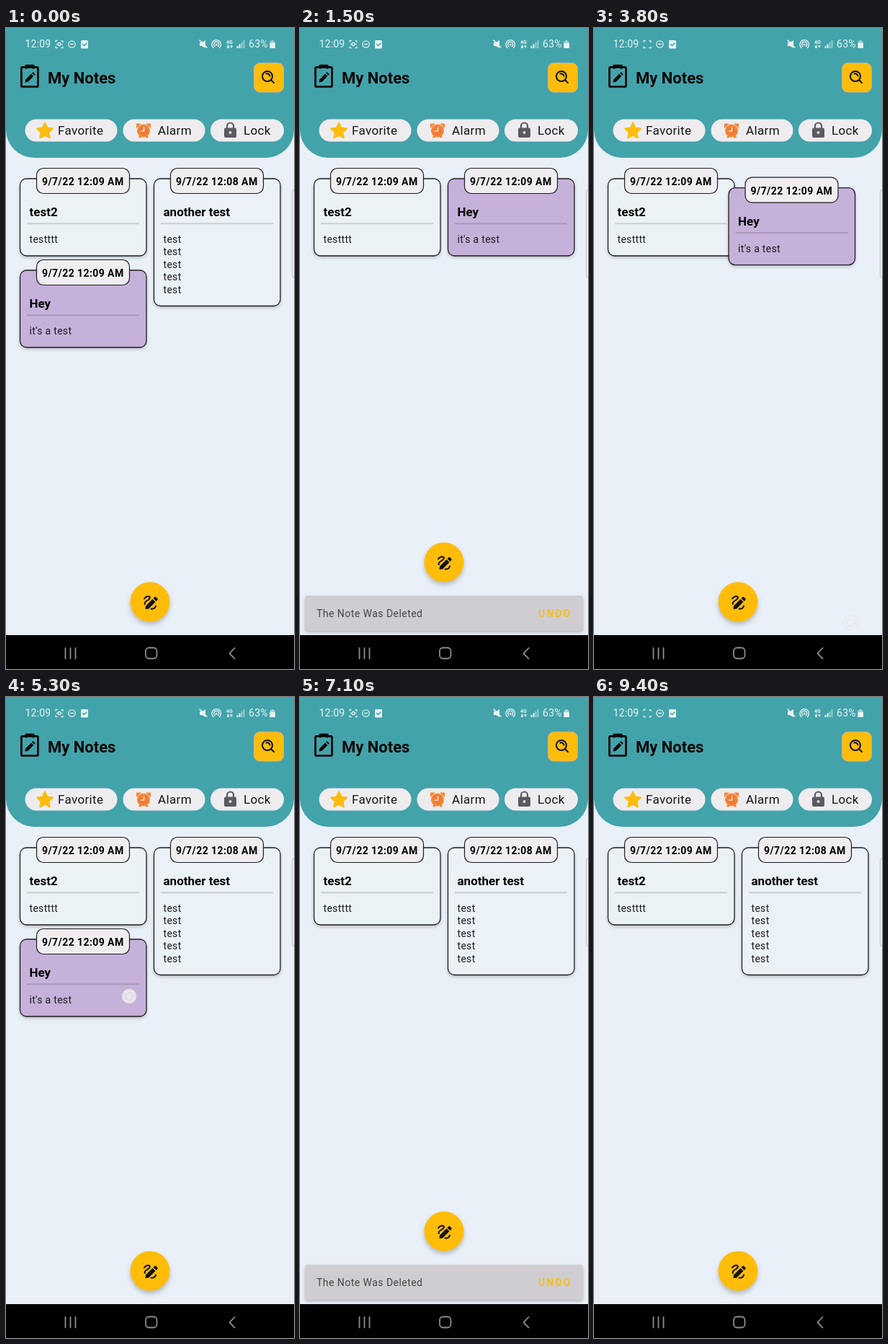
Animation, 400 px wide and 889 px high, one loop 9.5 s. Source, as an HTML page:

```html
<!DOCTYPE html>
<html lang="en">
<head>
<meta charset="utf-8">
<title>My Notes</title>
<style>
  html, body { margin: 0; width: 100%; height: 100%; overflow: hidden; background: #eaf0f7; }
  svg { display: block; width: 400px; height: 889px; font-family: Roboto, sans-serif; }
  text { white-space: pre; }
  .bold { font-weight: 700; }
  .chip { font-size: 17px; letter-spacing: .35px; fill: #151515; }
  .body { font-size: 14px; letter-spacing: .3px; fill: #1c1c1e; }
  .date { font-size: 14px; letter-spacing: .42px; font-weight: 700; }
  .title { font-size: 17px; font-weight: 700; }
  .line { fill: none; stroke-linecap: round; stroke-linejoin: round; }
  .card { filter: drop-shadow(0 2px 2px rgba(0, 0, 0, .2)); }
  .fab { filter: drop-shadow(0 4px 3px rgba(40, 50, 70, .28)); }
  .snack { filter: drop-shadow(0 2px 2px rgba(0, 0, 0, .25)); }
</style>
</head>
<body>
<svg viewBox="0 0 400 889">
  <rect width="400" height="889" fill="#eaf0f7"/>
  <rect x="397.5" y="223.5" width="12" height="123" rx="4" fill="#eef0f2" stroke="#b9bec2"/>

  <g id="notes"></g>

  <!-- header -->
  <rect y="-60" width="400" height="240" rx="39" fill="#43a3aa"/>
  <g fill="#e9f4f4" font-size="14">
    <text x="26.5" y="27" letter-spacing=".2">12:09</text>
    <text x="337" y="27" letter-spacing=".3">63%</text>
    <g class="line" stroke="#e0f0f0" stroke-width="1.3">
      <path d="M69 19v-1.500h2M77 18h2v1.500M69 26v1.500h2M77 27.500h2V26"/>
      <g id="rec"><circle cx="74" cy="22.500" r="2"/><path d="M70.500 22.500h.5M77.500 22.500h.5"/></g>
      <circle cx="91.500" cy="22.500" r="4.700"/><path d="M89.500 22.500h4"/>
    </g>
    <rect x="104" y="17" width="10" height="11.500" rx="1.500"/>
    <path class="line" d="M106.500 22.500l2 2 3.500-3.500" stroke="#43a3aa" stroke-width="1.500"/>
    <path d="M269 20h3l5-3v11l-5-3h-3z"/>
    <path class="line" d="M269 17l10 10" stroke="#e9f4f4" stroke-width="1.500"/>
    <g class="line" stroke="#e9f4f4" stroke-width="1.300">
      <path d="M288 27.500a6.300 6.300 0 1 1 8.500 0M290 25.500a3.600 3.600 0 1 1 4.500 0"/>
    </g>
    <circle cx="292.300" cy="23" r="1.500"/>
    <text class="bold" x="306" y="22" font-size="7">4G</text>
    <path d="M307 25l1.500-2 1.500 2v3h-3zM311.500 24h3v2l-1.500 2-1.500-2z" opacity=".8"/>
    <path d="M320.500 25h2v3h-2zM323.500 22.500h2V28h-2z"/>
    <path d="M326.500 20h2v8h-2zM329.500 17h2v11h-2z" opacity=".5"/>
    <path d="M366.500 18.500h2V17h3v1.500h2V28h-7z" opacity=".6"/>
    <path d="M366.500 21h7.500v7h-7.500z"/>
  </g>

  <g class="line" stroke="#0a0a0a" stroke-width="2.800">
    <rect x="21.400" y="54.400" width="23" height="27" rx="1.500"/>
    <path d="M28 55v-2.500h10V55" stroke-width="3.500"/>
  </g>
  <path d="M26.500 75.500l.6-4 7.900-8 3.300 3.300-7.900 8zM36 62.500l1.500-1.500 3.300 3.300-1.500 1.500z" fill="#0a0a0a"/>
  <text class="bold" x="58" y="76.500" font-size="22" fill="#080808">My Notes</text>

  <rect x="344.500" y="48.500" width="41" height="40.500" rx="8" fill="#febd0b" stroke="#c9b38c"/>
  <g class="line" stroke="#111" stroke-width="2">
    <circle cx="363" cy="67" r="7"/>
    <path d="M368.500 72.500l3.500 3.500M361.500 63.500a4 4 0 0 1 5 3"/>
  </g>

  <g fill="#eeecef">
    <rect x="26.500" y="126.500" width="128" height="31" rx="15.500"/>
    <rect x="162.500" y="126.500" width="114" height="31" rx="15.500"/>
    <rect x="284" y="126.500" width="102" height="31" rx="15.500"/>
  </g>
  <path id="star" fill="#fdbd0d" stroke="#fdbd0d" stroke-width="2" stroke-linejoin="round"/>
  <g fill="#f68634">
    <circle cx="191" cy="142.500" r="9"/>
    <path d="M181 139v-6.500h7zM201 139v-6.500h-7zM184 152l2-4 3 2-2 2.500zM198 152l-2-4-3 2 2 2.500z"/>
    <circle cx="191" cy="142.500" r="6.500" fill="#f27a35"/>
    <path class="line" d="M191.500 138v5h-4" stroke="#f6e2d4" stroke-width="1.700"/>
  </g>
  <rect x="303" y="138.500" width="17" height="13.500" rx="2" fill="#5c5a5f"/>
  <path d="M307 139v-3a4.500 4.500 0 0 1 9 0v3" fill="none" stroke="#5c5a5f" stroke-width="2.200"/>
  <circle cx="311.500" cy="145" r="2" fill="#d8d6da"/>
  <g class="chip">
    <text x="72" y="148">Favorite</text>
    <text x="211" y="148">Alarm</text>
    <text x="330" y="148">Lock</text>
  </g>

  <g id="snack">
    <rect class="snack" x="7" y="787.500" width="386" height="48.500" rx="4" fill="#cfcdd1"/>
    <text x="23" y="817" font-size="14" letter-spacing=".46" fill="#454548">The Note Was Deleted</text>
    <text class="bold" x="331" y="817" font-size="14" letter-spacing="2.200" fill="#f3bf20">UNDO</text>
  </g>

  <g id="fab">
    <circle class="fab" cx="200" cy="796" r="27.500" fill="#ffbd0a"/>
    <path d="M193.500 806l.5-4.500 9.500-9.500 4 4-9.500 9.500zM204.500 791l1.800-1.800q1-.9 2 0l2 2q.9 1 0 2l-1.800 1.800z" fill="#111"/>
    <path class="line" d="M192 791.500c2-3 6-4 7.500-2.500s-1 3.500-4 5.500-3.500 3.500-2.500 4.500M201.500 805.500c3 .5 6-1 6.500-4" stroke="#111" stroke-width="2"/>
  </g>

  <g id="dot">
    <circle r="10" fill="#f0eef0" fill-opacity=".85" stroke="#d9d4dc" stroke-opacity=".7"/>
    <circle r="5" fill="none" stroke="#cfc8d4" stroke-width="1.500" stroke-dasharray="1.500 2"/>
  </g>

  <!-- navigation bar -->
  <rect y="842" width="400" height="47" fill="#000"/>
  <g class="line" stroke="#8d8d8d" stroke-width="1.800">
    <path d="M82.500 860v14.500M89.500 860v14.500M96.500 860v14.500M317.500 860l-7 7.300 7 7.300"/>
    <rect x="194" y="859.500" width="15.500" height="15" rx="4.500"/>
  </g>
</svg>
<script>
const LOOP = 9500;
const $ = id => document.getElementById(id);

const HOME = { left: [0, 0], right: [186, 0], below: [0, 127] };

function addNote(date, title, lines, height, fill) {
  const g = document.createElementNS('http://www.w3.org/2000/svg', 'g');
  const body = lines.map((s, i) => `<text class="body" x="32.500" y="${298 + i * 17.45}">${s}</text>`).join('');
  g.innerHTML = `
    <rect class="card" x="19.500" y="209" width="175.500" height="${height}" rx="9" fill="${fill}" stroke="#1d1d22" stroke-width="1.300"/>
    <path d="M29 271.300H185" stroke="#000" stroke-opacity=".14" stroke-width="2"/>
    <rect x="42.500" y="194.500" width="129" height="35" rx="9.500" fill="#efedf0" stroke="#1d1d22" stroke-width="1.200"/>
    <text class="date" x="50" y="218">${date}</text>
    <text class="title" x="32.500" y="261">${title}</text>${body}`;
  $('notes').append(g);
  return g;
}

addNote('9/7/22 12:09 AM', 'test2', ['testttt'], 107, '#eaf2f6');
const hey = addNote('9/7/22 12:09 AM', 'Hey', ["it's a test"], 107, '#c6b1da');
const other = addNote('9/7/22 12:08 AM', 'another test', Array(5).fill('test'), 176.5, '#eaf1f7');

const star = Array.from({ length: 10 }, (_, i) => {
  const r = i % 2 ? 5.6 : 11.5, a = i * Math.PI / 5 - Math.PI / 2;
  return (54 + r * Math.cos(a)).toFixed(1) + ' ' + (143 + r * Math.sin(a)).toFixed(1);
});
$('star').setAttribute('d', 'M' + star.join('L') + 'Z');

const smooth = p => .5 - Math.cos(p * Math.PI) / 2;
const easeIn = p => p ** 1.6;
const easeOut = p => 1 - (1 - p) ** 3;
const ramp = (t, a, b, ease = smooth) => ease(Math.min(1, Math.max(0, (t - a) / (b - a))));
const pulse = (t, a, b, c, d) => ramp(t, a, b) - ramp(t, c, d);

function place(el, x, y, alpha = 1) {
  el.setAttribute('transform', `translate(${x.toFixed(2)} ${y.toFixed(2)})`);
  el.setAttribute('opacity', alpha.toFixed(3));
}

// Touches: [start, end, x, y, swipe distance]
const touches = [
  [560, 960, 345, 300, -250],
  [3480, 3780, 357, 825, 0],
  [5200, 5640, 171, 415, -150]
];

function draw(t) {
  // Right-hand note: swiped away, later restored
  const gone = t > 1050 && t < 4000;
  const away = t < 1060 ? ramp(t, 650, 1050, easeIn) : 0;
  place(other, HOME.right[0] - 400 * away, 0, gone ? 0 : t < 1060 ? 1 : ramp(t, 4000, 4120));

  // Purple note: fills the gap, returns, then is swiped away
  const shift = pulse(t, 1150, 1400, 3750, 4000);
  const out = ramp(t, 5310, 5720, easeIn);
  const [bx, by] = HOME.below;
  place(hey, bx + 186 * shift - 215 * out, by * (1 - shift), out < 1 ? 1 : 0);

  const up = ramp(t, 1150, 1400, easeOut) - ramp(t, 3500, 3750)
           + ramp(t, 5740, 5990, easeOut) - ramp(t, 8740, 8990);
  place($('snack'), 0, 55 * (1 - up), up > .001 ? 1 : 0);
  place($('fab'), 0, -55 * up);

  const touch = touches.find(([a, b]) => t >= a && t < b + 100);
  if (touch) {
    const [a, b, x, y, dist] = touch;
    const p = ramp(t, a + 100, b, easeIn);
    place($('dot'), x + (p > .02 ? dist * p : 0), y, pulse(t, a, a + 80, b - 40, b + 80));
  } else place($('dot'), 0, 0, 0);

  const blink = t % 1800 / 1800;
  $('rec').setAttribute('opacity', blink < .1 || blink > .65 ? 1 : 0);
}

const start = performance.now();
function tick() {
  draw((performance.now() - start) % LOOP);
  requestAnimationFrame(tick);
}
tick();
</script>
</body>
</html>
```
